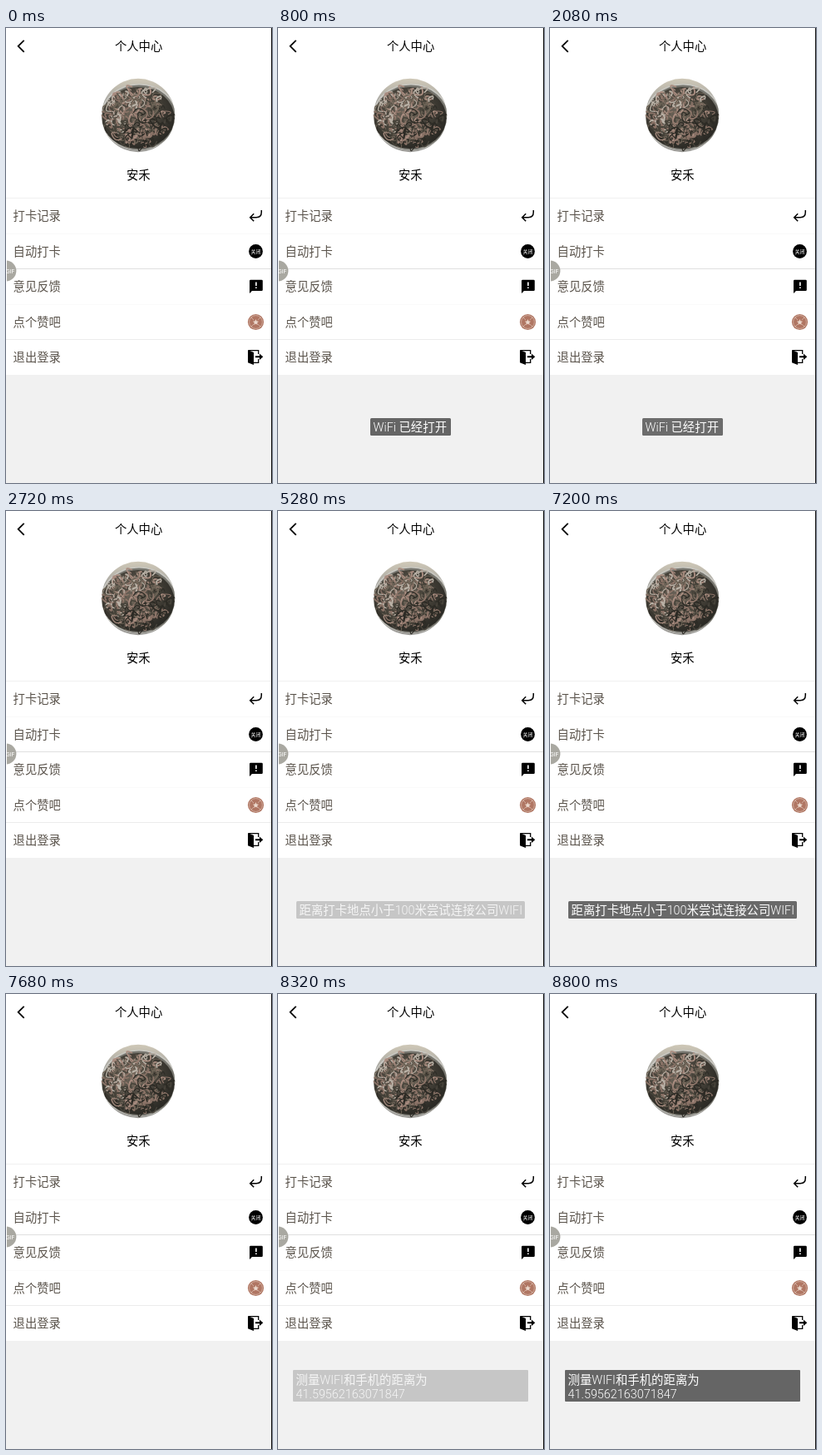
An HTML page for the animation above (9600 ms loop, 320 px wide and 547 px high).

```html
<!DOCTYPE html>
<html lang="zh-CN">
<head>
<meta charset="utf-8">
<title>个人中心</title>
<style>
  html, body { margin: 0; width: 100%; height: 100%; overflow: hidden; background: #fff; }
  svg { display: block; width: 320px; height: 547px; }
  text { font: 14.3px Roboto, "Noto Sans CJK SC", "Noto Sans CJK", sans-serif; }
  .mid { text-anchor: middle; }
  .row { fill: #5a534b; }
  .line { fill: none; stroke: #000; stroke-width: 1.8; }
  .toast { opacity: 0; }
  .toast rect { fill: #656565; }
  .toast text { fill: #fff; font-size: 14.4px; font-weight: 300; }
</style>
</head>
<body>
<svg viewBox="0 0 320 547">
  <defs>
    <clipPath id="round"><circle cx="159" cy="105" r="44.2"/></clipPath>
    <linearGradient id="table" x2="0" y2="1">
      <stop offset="0" stop-color="#d0c9b8"/>
      <stop offset=".3" stop-color="#aaa9a3"/>
      <stop offset="1" stop-color="#9c9b97"/>
    </linearGradient>
    <radialGradient id="food" cx=".42" cy=".38" r=".62">
      <stop offset="0" stop-color="#6a6258"/>
      <stop offset=".6" stop-color="#433f37"/>
      <stop offset="1" stop-color="#2b2a25"/>
    </radialGradient>
  </defs>

  <rect width="320" height="547" fill="#fff"/>
  <rect y="417" width="320" height="130" fill="#f1f1f1"/>
  <g id="rules"></g>

  <path class="line" d="M21.7 14.8l-7 7 7 7"/>
  <text class="mid" x="159.6" y="27.1">个人中心</text>

  <g clip-path="url(#round)">
    <rect x="114" y="60" width="90" height="90" fill="url(#table)"/>
    <ellipse cx="160" cy="107" rx="46" ry="40" fill="#c9c8c2"/>
    <ellipse cx="160" cy="107.5" rx="44.5" ry="39" fill="#77766f"/>
    <ellipse cx="159" cy="108" rx="43.5" ry="37" fill="url(#food)"/>
    <g id="noodles" fill="none" stroke-linecap="round"></g>
  </g>
  <text class="mid" x="159.2" y="182.4">安禾</text>

  <g id="rows"></g>

  <path class="line" style="stroke-width:1.5" d="M307.3 219v2.5q0 6.2-6.2 6.2h-7M298.2 223.2l-4.5 4.5 4.5 4.5"/>

  <circle cx="300.5" cy="268.5" r="8.4"/>
  <text class="mid" x="300.5" y="270.6" fill="#fff" style="font-size:6px;font-weight:500">关闭</text>

  <path d="M294.3 302.8h13.2q1.3 0 1.3 1.3v10.6q0 1.3-1.3 1.3H296l-3 3v-14.9q0-1.3 1.3-1.3z"/>
  <path d="M300.1 305.5h1.6v4.5h-1.6zm0 6h1.6v1.6h-1.6z" fill="#fff"/>

  <circle cx="300.5" cy="353.5" r="9.6" fill="#b07663"/>
  <g fill="none" stroke="#dcc0b2" stroke-width=".7">
    <circle cx="300.5" cy="353.5" r="7.9"/>
    <path d="M294.8 347.8l3.5 3.5M302.7 355.7l3.5 3.5M306.2 347.8l-3.5 3.5M298.3 355.7l-3.5 3.5"/>
  </g>
  <path d="M300.5 350l1 2.5 2.6.2-2 1.7.6 2.5-2.2-1.4-2.2 1.4.6-2.5-2-1.7 2.6-.2z" fill="#ecd9ce"/>

  <path class="line" style="stroke-width:1.3" d="M292 387.6h11.7v4.4M303.7 398v4.3H297"/>
  <path d="M291 387l7 3v15l-7-2.8zM300 394.2h5v-2.7l4.3 3.8-4.3 3.8v-2.9h-5z"/>

  <circle cx="0" cy="292" r="12.4" fill="#a9a8a1"/>
  <text class="mid" x="5.2" y="294.6" fill="#fff" style="font-size:7px">GIF</text>
  <rect y="279" width="1" height="26" fill="#fff"/>
  <rect x="319" width="1" height="547" fill="#111"/>

  <g id="wifi" class="toast">
    <rect x="111" y="469" width="97" height="21" rx="1.5"/>
    <text x="114.5" y="485.3">WiFi 已经打开</text>
  </g>
  <g id="near" class="toast">
    <rect x="22" y="469" width="275" height="21" rx="1.5"/>
    <text x="25.5" y="485.3">距离打卡地点小于100米尝试连接公司WIFI</text>
  </g>
  <g id="range" class="toast">
    <rect x="18" y="452" width="283" height="38" rx="1"/>
    <text x="21.5" y="468.5">测量WIFI和手机的距离为</text>
    <text x="21.5" y="486">41.59562163071847</text>
  </g>
</svg>
<script>
const LOOP = 9600;
const $ = id => document.getElementById(id);

function add(parent, tag, attrs, text = '') {
  const el = document.createElementNS('http://www.w3.org/2000/svg', tag);
  for (const key in attrs) el.setAttribute(key, attrs[key]);
  el.textContent = text;
  parent.append(el);
}

['打卡记录', '自动打卡', '意见反馈', '点个赞吧', '退出登录'].forEach((label, i) =>
  add($('rows'), 'text', { class: 'row', x: 8.6, y: 231.2 + i * 42.5 }, label));

[[204, '#f0f0f0'], [247, '#f9f9f9'], [289, '#dfdfdf'], [332, '#fafafa'], [374, '#ececec']]
  .forEach(([y, fill]) => add($('rules'), 'rect', { y, width: 319, height: 1, fill }));

// Loose seeded strands over the bowl, lighter towards the upper left
let seed = 11;
const rnd = () => (seed = seed * 16807 % 2147483647) / 2147483647;
const tones = ['#2d2b25', '#47433a', '#6b6255', '#8c7468', '#a98d80', '#b9b1a6'];
for (let i = 0; i < 210; i++) {
  const a = rnd() * Math.PI * 2, d = Math.sqrt(rnd());
  const dx = Math.cos(a) * d, dy = Math.sin(a) * d;
  const light = 0.5 - 0.2 * dx - 0.3 * dy + (rnd() - 0.5) * 0.9;
  const tone = Math.floor(Math.min(0.99, Math.max(0, light)) * tones.length);
  const r = 2 + rnd() * 4, bend = r * (0.2 + rnd()), turn = rnd() * 360;
  add($('noodles'), 'path', {
    d: `M${-r} 0q${r} ${-2 * bend} ${2 * r} 0t${-r * 0.6} ${r}`,
    transform: `translate(${159 + dx * 39} ${107 + dy * 33}) rotate(${turn})`,
    stroke: tones[tone],
    'stroke-width': 1 + rnd()
  });
}

// [time in ms, opacity], each value held until the next
const fades = {
  wifi: [[320, .3], [480, .6], [640, .9], [800, 1], [2080, .95], [2240, .68], [2400, .38], [2560, .1], [2720, 0]],
  near: [[5280, .3], [5440, .6], [5600, .9], [5760, 1], [7200, .97], [7360, .65], [7520, .32], [7680, 0]],
  range: [[8320, .3], [8480, .6], [8640, .9], [8800, 1]]
};
for (const id in fades) {
  const steps = fades[id];
  const frames = [[0, 0], ...steps, [LOOP, steps[steps.length - 1][1]]]
    .map(([t, opacity]) => ({ offset: t / LOOP, opacity, easing: 'step-end' }));
  $(id).animate(frames, { duration: LOOP, iterations: Infinity });
}
</script>
</body>
</html>
```
